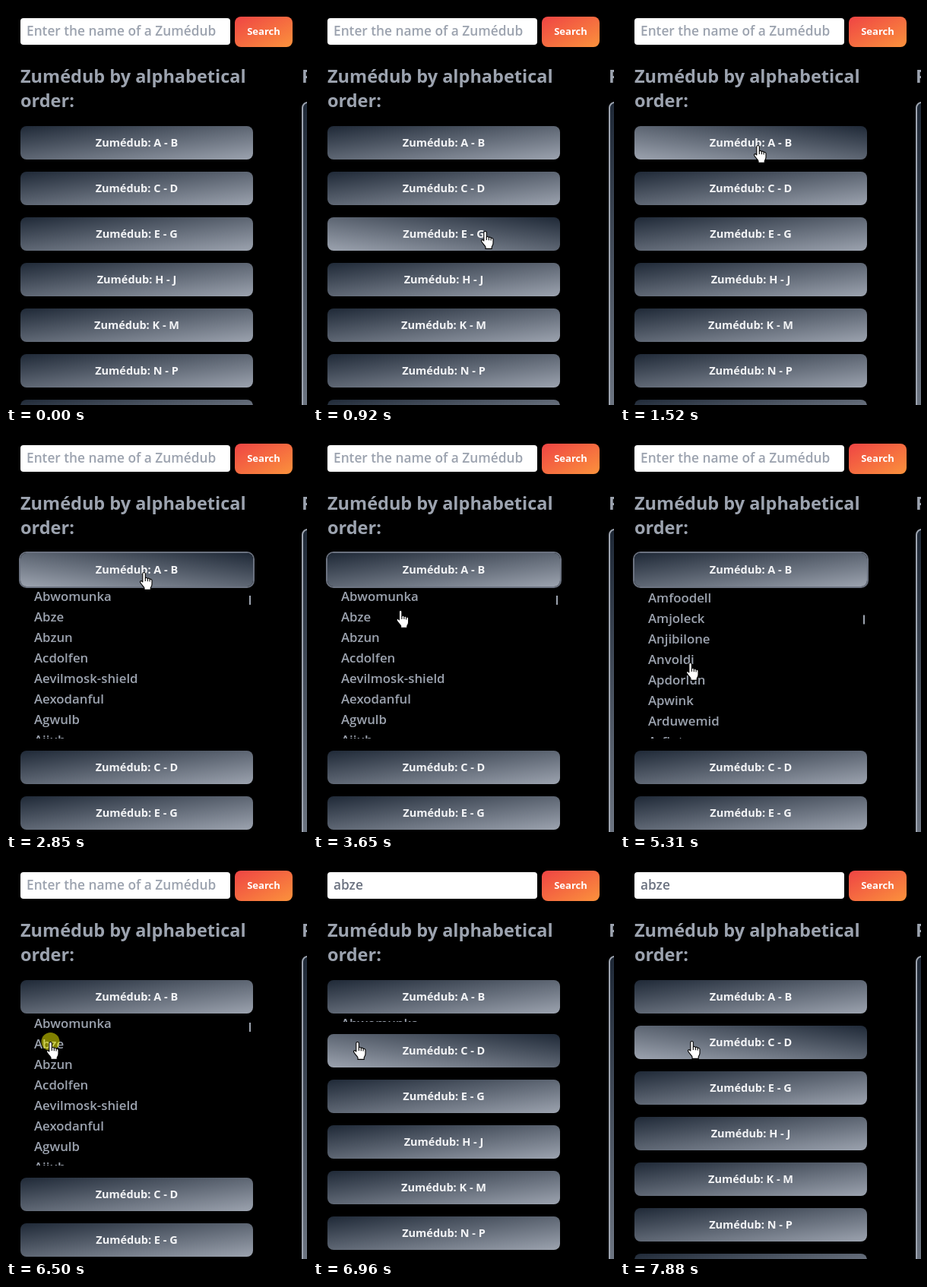
Animation of 396 by 525 pixels, one loop 8000 ms. Source, as an HTML page:

```html
<!DOCTYPE html>
<html lang="en">
<head>
<meta charset="utf-8">
<title>Creature finder</title>
<style>
  html, body { margin: 0; width: 100%; height: 100%; overflow: hidden; background: #000; }
  #stage {
    position: relative; width: 396px; height: 525px; overflow: hidden;
    background: #000; color: #9ca3af;
    font-family: "Open Sans", "Noto Sans", sans-serif; white-space: nowrap;
  }
  #stage > * { position: absolute; }
  #field {
    left: 19px; top: 16px; width: 268px; height: 35px; padding-left: 8px;
    border-radius: 4px; background: #fff; font-weight: 600; font-size: 17.3px; line-height: 33px;
  }
  #field.filled { color: #6b7280; }
  #search {
    left: 301px; top: 14px; width: 76px; height: 40px; border-radius: 8px;
    background: linear-gradient(to bottom right, #ef4444, #fb923c);
    color: #fff; font-weight: 700; font-size: 13px; line-height: 39px; text-align: center;
  }
  h2 { margin: 0; top: 76px; font-weight: 700; font-size: 23.5px; line-height: 32px; }
  #card {
    left: 389px; top: 126px; width: 300px; height: 640px; border-radius: 8px;
    border: 2px solid #9ca3af; background: linear-gradient(#1f2937, #9ca3af);
  }
  #menu { left: 19px; top: 158px; width: 306px; isolation: isolate; }
  .bar {
    position: relative; z-index: 1; height: 44px; margin-bottom: 16px; border-radius: 8px;
    background: linear-gradient(to bottom right, #1f2937, #9ca3af);
    color: #f3f4f6; font-weight: 700; font-size: 14.5px; line-height: 44px; text-align: center;
  }
  .bar.hover { background: linear-gradient(to bottom left, #1f2937, #9ca3af); }
  .bar.focus { box-shadow: 0 0 0 2px #6b7280; }
  .bar:first-child { margin-bottom: 0; }
  #list { position: relative; height: 0; margin-bottom: 16px; overflow: hidden; }
  #names { position: absolute; left: 18px; top: -1px; font-weight: 600; font-size: 16.8px; line-height: 27px; }
  #thumb { position: absolute; left: 301px; top: 12px; width: 2px; height: 12px; background: #9ca3af; }
  #click { left: -12px; top: -12px; width: 24px; height: 24px; border-radius: 50%; background: rgba(255, 255, 0, .5); }
  #cursor { left: 0; top: 0; overflow: visible; }
  #cursor path { fill: #fff; stroke: #000; stroke-width: 1.1; stroke-linejoin: round; }
  #cursor .line { fill: none; }
</style>
</head>
<body>
<div id="stage">
  <div id="field"></div>
  <div id="search">Search</div>
  <h2 style="left:19px">Zumédub by alphabetical<br>order:</h2>
  <h2 style="left:389px">Profile:</h2>
  <div id="card"></div>
  <div id="menu"></div>
  <div id="click"></div>
  <svg id="cursor" width="18" height="25">
    <g id="hand" transform="translate(-5.7 0)">
      <path d="M4 13V2.2a1.75 1.75 0 0 1 3.5 0V8c.5-.9 2.7-.8 3 .6.8-.8 2.6-.4 2.8.9 1-.7 2.9 0 2.9 1.7V16c0 2.5-1.4 3.8-1.8 5v2.4H6.2V21C5 19 2.5 16.5.9 13.8.1 12.4 1.7 11 3 12Z"/>
      <path class="line" d="M7.5 8v4M10.5 8.6v3.6M13.3 9.5v3"/>
    </g>
    <path id="arrow" d="M0 0V16L3.7 12.5 6.4 18.6 9 17.5 6.4 11.6H11.5Z"/>
  </svg>
</div>
<script>
const LOOP = 8000, TICK = 66.2;
const $ = id => document.getElementById(id);

const ranges = ["A - B", "C - D", "E - G", "H - J", "K - M", "N - P", "Q - S"];
const names = `Abwomunka Abze Abzun Acdolfen Aevilmosk-shield Aexodanful Agwulb Aijub
  Alduwosk Alfumbel Alnuvodda Alvorni Amdulo Amdunel Amfoodell Amjoleck Anjibilone
  Anvoldi Apdorlun Apwink Arduwemid Arfint Arjolun Arnidesk`.split(/\s+/);

const rows = ranges.map(r => `<div class="bar">Zumédub: ${r}</div>`);
rows.splice(1, 0, `<div id="list"><div id="names">${names.join("<br>")}</div><div id="thumb"></div></div>`);
$("menu").innerHTML = rows.join("");
const bars = [...document.querySelectorAll(".bar")];

const ease = u => { u = Math.min(1, Math.max(0, u)); return u * u * (3 - 2 * u); };
const glide = (value, now, from, to, target) => value + (target - value) * ease((now - from) / (to - from));
const within = (now, from, to) => now >= from && now < to;
const show = (el, on) => { el.style.display = on ? "" : "none"; };

// Pointer trips: start, end, destination.
const trips = [
  { from: 660, to: 927, x: 226.5, y: 296 },
  { from: 927, to: 1456, x: 181.5, y: 183 },
  { from: 3050, to: 3910, x: 95, y: 248 },
  { from: 3910, to: 4303, x: 91.5, y: 292 },
  { from: 4303, to: 4580, x: 92.5, y: 302 },
  { from: 5670, to: 6360, x: 58.5, y: 239 },
  { from: 7485, to: 7680, x: 75, y: 190 },
  { from: 7680, to: 7877, x: 94.5, y: 238 }
];

function pointer(now) {
  return trips.reduce((p, { from, to, x, y }) => ({
    x: glide(p.x, now, from, to, x),
    y: glide(p.y, now, from, to, y)
  }), { x: 341, y: 477 });
}

function draw(t) {
  const now = Math.floor((t + 8) / TICK) * TICK;
  const { x, y } = pointer(now);
  const scroll = glide(glide(0, now, 4140, 4550, 400), now, 5230, 5670, 0);
  const height = glide(glide(0, now, 2250, 2580, 200), now, 6560, 7015, 0);
  const present = now > 660, inside = present && x >= 19 && x < 325;

  $("list").style.height = height + "px";
  $("names").style.transform = `translateY(${-scroll}px)`;
  $("thumb").style.transform = `translateY(${scroll * .068}px)`;
  show($("thumb"), within(now, 2700, 6600));

  let over = inside && y >= 202 && y < 202 + height;
  bars.forEach((bar, i) => {
    const top = 158 + 60 * i + (i ? height : 0);
    const hover = inside && y >= top && y < top + 44;
    bar.classList.toggle("hover", hover);
    over = over || hover;
  });
  bars[0].classList.toggle("focus", within(now, 2240, 6480));

  const filled = now > 6600;
  $("field").textContent = filled ? "abze" : "Enter the name of a Zumédub";
  $("field").classList.toggle("filled", filled);

  $("cursor").style.transform = $("click").style.transform = `translate(${x}px, ${y}px)`;
  show($("cursor"), present);
  show($("hand"), over);
  show($("arrow"), !over);
  show($("click"), within(now, 2240, 2380) || within(now, 6480, 6600));
}

const start = performance.now();
function frame() {
  draw((performance.now() - start) % LOOP);
  requestAnimationFrame(frame);
}
frame();
</script>
</body>
</html>
```
